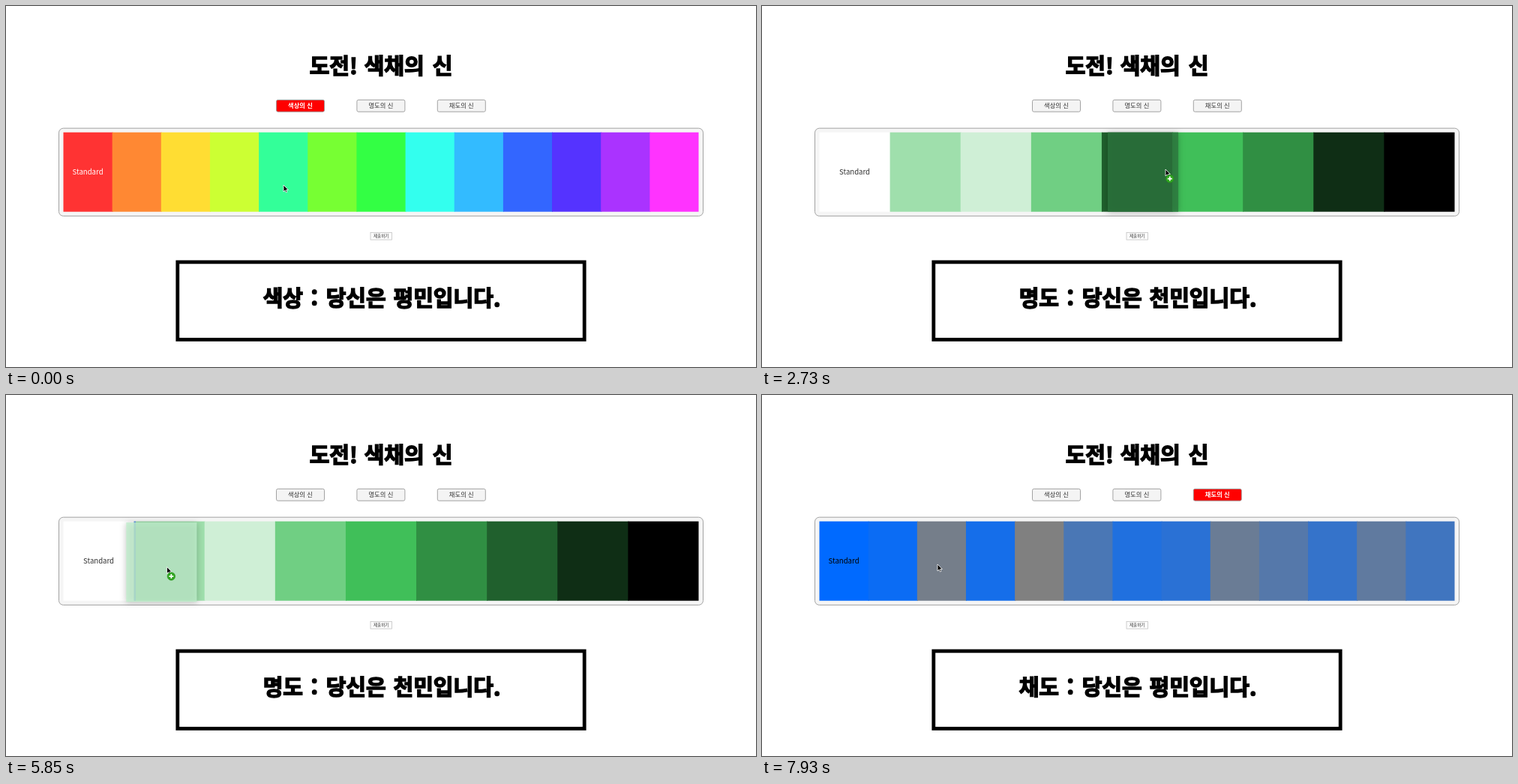
These frames come from a looping animation (1000x482 px, 8000 ms). An HTML page:

```html
<!DOCTYPE html>
<html lang="ko">
<head>
<meta charset="utf-8">
<style>
  html, body { margin: 0; width: 100%; height: 100%; overflow: hidden; background: #fff; }
  svg { display: block; width: 100%; height: 100%; }
  text { font-family: "Noto Sans CJK KR", "Noto Sans CJK", sans-serif; }
  .heavy { font-size: 29px; font-weight: 900; stroke: #000; stroke-width: 1.5; stroke-linejoin: miter; }
  .small { font-size: 8.3px; text-anchor: middle; fill: #333; }
  .button rect { fill: #f4f4f4; stroke: #999; stroke-width: .9; }
  .button.active rect { fill: #f00; }
  .button.active text { fill: #fff; font-weight: 700; }
  #ghost { filter: drop-shadow(0 1px 4px rgba(0, 0, 0, .3)); }
</style>
</head>
<body>
<svg viewBox="0 0 1000 482">
  <text class="heavy" y="91"><tspan x="404.7">도전!</tspan><tspan x="477.7">색채의</tspan><tspan x="568.7">신</tspan></text>
  <g id="buttons"></g>
  <rect x="70.5" y="163.2" width="859" height="117.2" rx="6" fill="#f5f5f5" stroke="#999" stroke-width=".9"/>
  <g id="swatches"></g>
  <rect id="dropLine" y="168.7" height="106" width="2.4" fill="#6495ed"/>
  <text id="standard" y="224.8" font-size="9.6" text-anchor="middle">Standard</text>
  <rect x="486" y="302.5" width="28.4" height="9.6" fill="#fcfcfc" stroke="#c4c4c4" stroke-width=".8"/>
  <text class="small" x="500.2" y="309.3" style="font-size:5.6px">제출하기</text>
  <rect x="228.8" y="341.9" width="542.4" height="103.5" fill="#fff" stroke="#000" stroke-width="4.8"/>
  <text class="heavy" y="401"><tspan id="subject" x="342.7"></tspan><tspan x="406.5">:</tspan><tspan x="426.7">당신은</tspan><tspan id="rank" x="516.5"></tspan></text>
  <g id="ghost">
    <rect id="ghostColor" height="106" opacity=".76"/>
    <rect id="ghostSheen" height="106" fill="#6fdf90" opacity=".13"/>
  </g>
  <g id="cursor">
    <path d="M0 0V9L2.1 7.1L3.4 10L4.9 9.4L3.6 6.5H6.4Z" fill="#000" stroke="#fff" stroke-width=".8"/>
    <g id="badge">
      <circle cx="5.8" cy="12.6" r="5.3" fill="#2fa51f" stroke="#278c1b" stroke-width=".5"/>
      <path d="M2.8 12.6h6M5.8 9.6v6" stroke="#fff" stroke-width="1.7"/>
    </g>
  </g>
</svg>
<script>
const LOOP = 8000, STEP = 130, LEFT = 76.5, TOP = 168.7, WIDTH = 847, HEIGHT = 106;
const $ = id => document.getElementById(id);

const modes = [
  { start: 0, subject: '색상', rank: '평민입니다.', label: '#fff', weight: 500, active: true,
    colors: ['#f33', '#f83', '#fd3', '#cf3', '#3f9', '#7f3', '#3f4', '#3fe', '#3bf', '#36f', '#53f', '#a3f', '#f3f'] },
  { start: 2080, subject: '명도', rank: '천민입니다.', label: '#333', weight: 400, active: false,
    colors: [100, 75, 87.5, 62.5, 25, 50, 37.5, 12, 0].map(l => `hsl(132,50%,${l}%)`) },
  { start: 7150, subject: '채도', rank: '평민입니다.', label: '#000', weight: 400, active: true,
    colors: [12, 11, 1, 10, 0, 5, 9, 8, 2, 4, 7, 3, 6].map(s => `hsl(215,${s / .12}%,50%)`) }
];

// The image is carried from start to release; the list reorders at drop.
const drags = [
  { mode: 0, from: 4, before: 7, start: 390, release: 1560, drop: 1690 },
  { mode: 1, from: 4, before: 7, start: 2600, release: 3770, drop: 3900 },
  { mode: 1, from: 2, before: 1, start: 5330, release: 6240, drop: 6300 }
];

// time, x, y of the pointer tip
const path = [
  [0, 370, 239], [390, 343, 243], [1300, 515, 246], [1560, 560, 245], [2080, 500, 133],
  [2600, 530, 218], [2730, 538, 218], [3380, 775, 229], [3640, 752, 226], [3900, 752, 226],
  [4810, 319, 228], [5330, 319, 228], [6110, 178, 230], [6240, 178, 230],
  [6760, 481, 213], [7150, 607, 133], [7930, 234, 226], [8000, 234, 226]
];

function pointerAt(t) {
  const i = Math.max(1, path.findIndex(key => key[0] > t));
  const [t0, x0, y0] = path[i - 1], [t1, x1, y1] = path[i];
  const p = (t - t0) / (t1 - t0), e = p * p * (3 - 2 * p);
  return [x0 + (x1 - x0) * e, y0 + (y1 - y0) * e];
}

function moveBefore(list, from, before) {
  const [item] = list.splice(from, 1);
  list.splice(before > from ? before - 1 : before, 0, item);
}

function set(id, attributes) {
  for (const name in attributes) $(id).setAttribute(name, attributes[name]);
}

const show = (id, visible) => $(id).style.display = visible ? '' : 'none';

$('buttons').innerHTML = modes.map(({ subject }, i) => {
  const x = 360.5 + i * 107.4;
  return `<g class="button"><rect x="${x}" y="125.4" width="64" height="15.8" rx="2"/>` +
    `<text class="small" x="${x + 32}" y="136.2">${subject}의 신</text></g>`;
}).join('');

function draw(t) {
  const modeIndex = modes.findLastIndex(m => m.start <= t);
  const mode = modes[modeIndex];
  const colors = [...mode.colors];
  const width = WIDTH / colors.length;
  const [x, y] = pointerAt(t);

  for (const d of drags)
    if (d.mode === modeIndex && t >= d.drop) moveBefore(colors, d.from, d.before);

  // Each swatch runs one pixel under the next, so no seam shows.
  $('swatches').innerHTML = colors.map((color, i) =>
    `<rect x="${LEFT + i * width}" y="${TOP}" width="${width + (i < colors.length - 1)}" height="${HEIGHT}" fill="${color}"/>`).join('');
  [...$('buttons').children].forEach((button, i) =>
    button.classList.toggle('active', i === modeIndex && mode.active));
  set('standard', { x: LEFT + width / 2, fill: mode.label, 'font-weight': mode.weight });
  $('subject').textContent = mode.subject;
  $('rank').textContent = mode.rank;

  const drag = drags.find(d => t >= d.start && t < d.drop);
  const carried = drag && t > drag.start && t < drag.release;
  const hovered = Math.floor((x - LEFT) / width);
  show('dropLine', drag && hovered !== drag.from);
  set('dropLine', { x: LEFT + hovered * width });
  show('ghost', carried);
  show('badge', carried);
  if (carried) {
    const [grabX, grabY] = pointerAt(drag.start);
    const place = { x: LEFT + drag.from * width + x - grabX, y: TOP + y - grabY, width };
    set('ghostColor', { ...place, fill: colors[drag.from] });
    set('ghostSheen', place);
  }
  set('cursor', { transform: `translate(${x} ${y})` });
}

const begin = performance.now();
function frame() {
  const t = (performance.now() - begin) % LOOP;
  draw(Math.floor(t / STEP) * STEP);
  requestAnimationFrame(frame);
}
frame();
</script>
</body>
</html>
```
